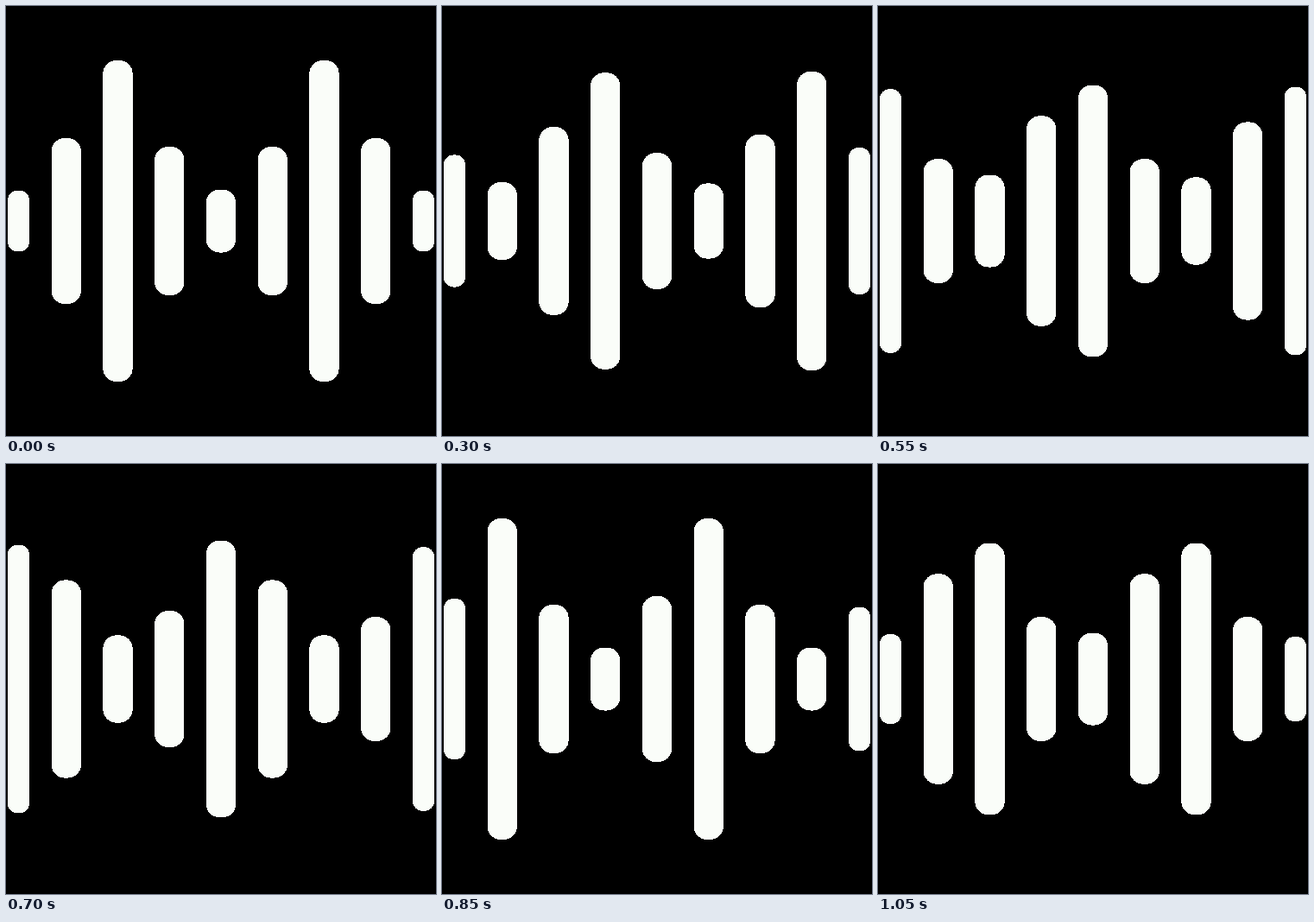
An HTML page for the animation above (1100 ms loop, 498 by 498 pixels).

```html
<!DOCTYPE html>
<html lang="en">
<head>
<meta charset="utf-8">
<title>Sound bars</title>
<style>
  html, body { margin: 0; width: 100%; height: 100%; overflow: hidden; background: #000; }
  svg { display: block; width: 100vw; height: 100vh; fill: #fafdf9; shape-rendering: crispEdges; }
</style>
</head>
<body>
<svg id="stage" viewBox="0 0 498 498"></svg>
<script>
const CENTER = 249, PITCH = 59.75, EDGE = 234.5;
const REACH = 4;                      // bars on each side of the middle one
const STEP = 50, STEPS = 22, SEGMENT = 7;
const LEVELS = [36.5, 86, 186, 96];   // half-heights along one wave

const stage = document.getElementById("stage");

function makeBar(place) {
  const outer = Math.abs(place) === REACH;
  const width = outer ? 25 : 34.4;
  const x = CENTER + (outer ? Math.sign(place) * EDGE : place * PITCH);
  const rect = document.createElementNS("http://www.w3.org/2000/svg", "rect");
  rect.setAttribute("x", x - width / 2);
  rect.setAttribute("width", width);
  rect.setAttribute("rx", width * 0.45);
  stage.append(rect);
  return { rect, place, scale: outer ? 0.97 : 1 };
}

const bars = Array.from({ length: 2 * REACH + 1 }, (_, i) => makeBar(i - REACH));

// The wave is mirrored about its origin
const level = d => LEVELS[Math.abs(d) % LEVELS.length];

// The wave moves evenly at first, then about 1.4 times faster
function phaseAt(step) {
  return step < 8 ? step : Math.round(12 + (step - 11) * 10 / 7);
}

// Each bar takes the level of its right-moving place on the wave
function draw(time) {
  const phase = phaseAt(Math.floor(time / STEP) % STEPS) / SEGMENT;
  const k = Math.floor(phase);
  for (const { rect, place, scale } of bars) {
    const from = level(place - k), to = level(place - k - 1);
    const half = scale * (from + (to - from) * (phase - k));
    rect.setAttribute("y", CENTER - half);
    rect.setAttribute("height", half * 2);
  }
}

let start;
function tick(now) {
  start ??= now;
  draw(now - start);
  requestAnimationFrame(tick);
}

draw(0);
requestAnimationFrame(tick);
</script>
</body>
</html>
```
